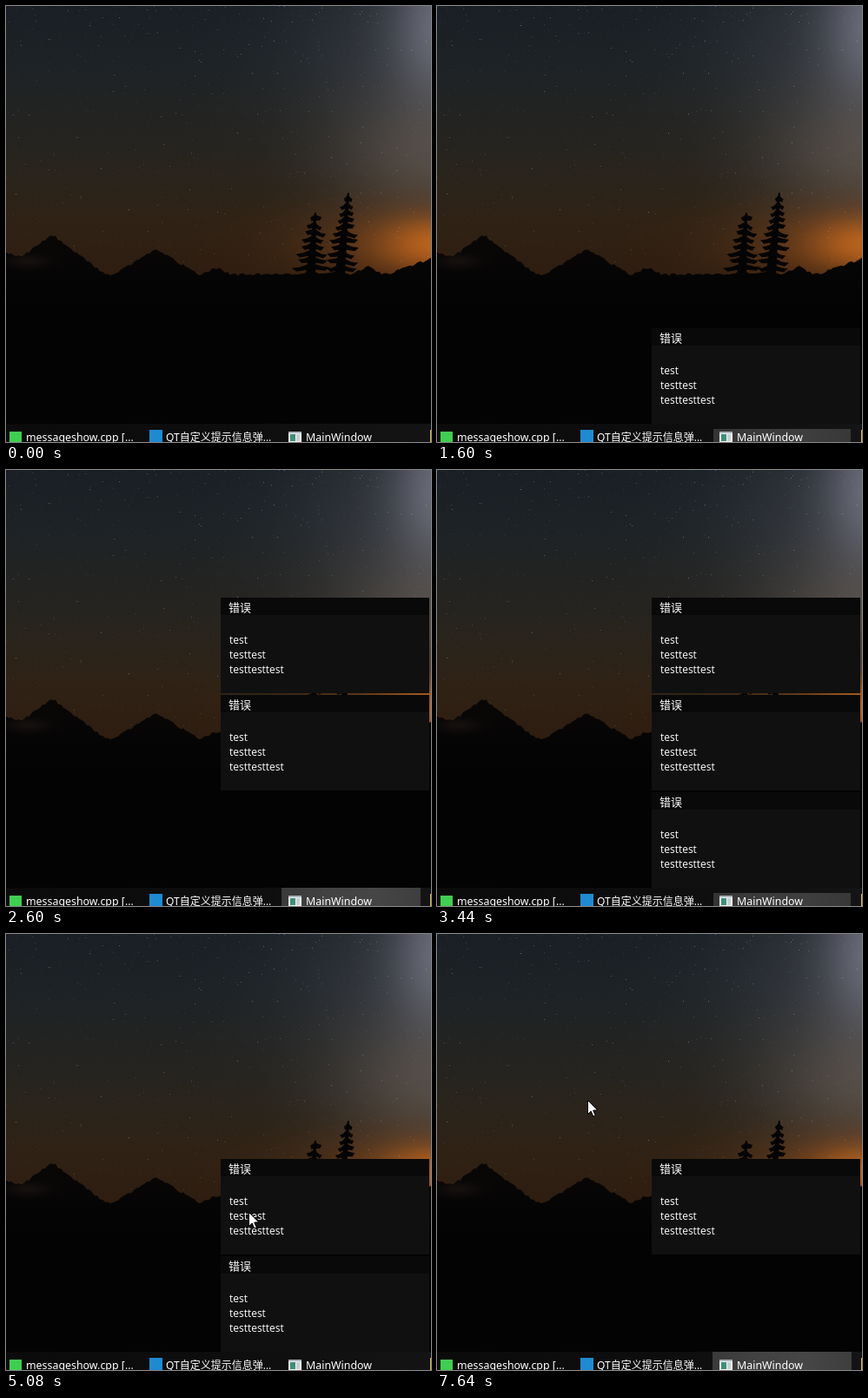
Write an HTML page with a canvas that moves like this. It is 489 px wide and 502 px high and loops after 8000 ms.

```html
<!DOCTYPE html>
<html lang="zh">
<head>
<meta charset="utf-8">
<style>
html, body { margin: 0; width: 100%; height: 100%; overflow: hidden; background: #000; }
canvas { display: block; }
</style>
</head>
<body>
<canvas id="stage" width="489" height="502"></canvas>
<script>
const W = 489, H = 502, LOOP = 8000, TICK = 40;
const BAR_Y = 481, HORIZON = 309;
const PANEL = { x: 247, y: 371, w: 240, h: 110, pitch: 112 };
const FADE_IN = 360, LIFE = 3080, FADE_STEP = 90;
const SANS = '"Noto Sans", "Noto Sans CJK SC", "Noto Sans CJK", sans-serif';

// The last activation opens no message; the hovered message does not expire
const activations = [640, 1600, 2560, 3440, 7560];
const messages = activations.slice(0, 4).map((at, i) => ({
  show: at + TICK,
  out: i === 2 ? Infinity : at + TICK + LIFE
}));

const ctx = document.getElementById('stage').getContext('2d');

const clamp = (v, lo = 0, hi = 1) => Math.min(hi, Math.max(lo, v));
const mix = (a, b, p) => a + (b - a) * p;
const easeOut = p => 1 - (1 - p) ** 2;

function seededRandom(seed) {
  return () => {
    seed = (seed * 1664525 + 1013904223) >>> 0;
    return seed / 4294967296;
  };
}

function polygon(c, points) {
  c.beginPath();
  points.forEach(([x, y]) => c.lineTo(x, y));
  c.closePath();
}

function box(color, x, y, w, h) {
  ctx.fillStyle = color;
  ctx.fillRect(x, y, w, h);
}

function write(text, x, y, size, family = SANS) {
  ctx.font = `${size}px ${family}`;
  ctx.fillStyle = '#fff';
  ctx.fillText(text, x, y);
}

function gradient(c, x0, y0, x1, y1, colors) {
  const g = c.createLinearGradient(x0, y0, x1, y1);
  colors.forEach((color, i) => g.addColorStop(i / (colors.length - 1), color));
  return g;
}

// Elliptical light with a Gaussian falloff
function glow(c, x, y, rx, ry, rgb, strength) {
  const g = c.createRadialGradient(0, 0, 0, 0, 0, 1);
  for (let r = 0; r <= 1; r += 0.125) {
    g.addColorStop(r, `rgba(${rgb},${strength * Math.exp(-4.5 * r * r) * (1 - r ** 4)})`);
  }
  c.save();
  c.translate(x, y);
  c.scale(rx, ry);
  c.fillStyle = g;
  c.fillRect(-1, -1, 2, 2);
  c.restore();
}

function drawSky(c) {
  c.fillStyle = gradient(c, 0, 0, 0, HORIZON,
    ['#1a1f25', '#1d2226', '#222322', '#28241d', '#2f2215', '#2e1d10']);
  c.fillRect(0, 0, W, HORIZON + 10);
  glow(c, 500, 60, 320, 300, '125,125,135', 0.3);
  glow(c, 500, 20, 110, 190, '155,155,175', 0.5);
  glow(c, 500, 175, 230, 150, '130,115,105', 0.42);
  glow(c, 500, 276, 300, 95, '185,95,30', 0.5);
  glow(c, 496, 274, 125, 60, '230,120,30', 0.6);
}

function drawStars(c) {
  const rnd = seededRandom(71);
  for (let i = 0; i < 1000; i++) {
    const x = Math.floor(rnd() * W), y = Math.floor(rnd() ** 1.25 * 295);
    const bright = rnd() ** 6;
    const tint = rnd() < 0.5 ? '190,170,150' : '150,165,190';
    c.fillStyle = `rgba(${tint},${0.08 + bright * 0.45})`;
    c.fillRect(x, y, 1, 1);
  }
}

// Ridge line: the highest of a few sloping peaks above a flat horizon
function ridgeY(x) {
  const peaks = [[0, 284, 0.25], [53, 263, 0.75], [173, 280, 0.6],
    [242, 301, 0.45], [416, 299, 0.6], [489, 291, 0.35]];
  return Math.min(HORIZON, ...peaks.map(([px, py, slope]) => py + Math.abs(x - px) * slope));
}

function drawLand(c) {
  const rnd = seededRandom(5);
  const ridge = [];
  for (let x = 0; x <= W + 3; x += 3) ridge.push([x, ridgeY(x) + rnd() * 3 - 1.5]);
  c.fillStyle = gradient(c, 0, 262, 0, 350, ['#090706', '#060505', '#030303']);
  polygon(c, [...ridge, [W, H], [0, H]]);
  c.fill();
  glow(c, 25, 294, 48, 16, '50,34,32', 0.35);
}

// Ragged conifer: thin trunk with drooping tiers of uneven branches
function drawTree(c, tip, top, foot, base, half, seed) {
  const rnd = seededRandom(seed);
  c.fillStyle = '#050404';
  polygon(c, [[tip - 1, top], [tip + 1, top], [foot + 6, base], [foot - 6, base]]);
  c.fill();
  for (let y = top + 6; y < base; y += 8) {
    const p = (y - top) / (base - top);
    const x = mix(tip, foot, p);
    for (const side of [-1, 1]) {
      const reach = side * half * Math.sqrt(p) * mix(0.75, 1.15, rnd());
      const droop = mix(0, 4, rnd());
      polygon(c, [[x, y - 4], [x + reach * 0.6, y + droop - 2],
        [x + reach, y + droop - 1], [x + reach * 0.75, y + droop + 3], [x, y + 3]]);
      c.fill();
    }
  }
}

function buildBackdrop() {
  const layer = document.createElement('canvas');
  layer.width = W;
  layer.height = H;
  const c = layer.getContext('2d');
  drawSky(c);
  drawStars(c);
  drawLand(c);
  drawTree(c, 356, 238, 350, 316, 24, 9);
  drawTree(c, 394, 215, 384, 310, 21, 23);
  c.fillStyle = gradient(c, 0, 0, W, 0, ['#0b0b0b', '#0d0d0d', '#141414']);
  c.fillRect(0, BAR_Y, W, H - BAR_Y);
  c.fillStyle = '#e3c520';
  c.fillRect(488, 488, 1, 14);
  return layer;
}

function drawHighlight(t) {
  const start = activations.filter(at => at <= t).pop();
  if (start === undefined) return;
  const age = t - start;
  const inset = age < TICK ? 1 : 0;
  const stays = start === activations[activations.length - 1];
  ctx.globalAlpha = inset ? 0.85 : stays ? 1 : clamp((320 - age) / 200);
  box(gradient(ctx, 317, 0, 477, 0, ['#3a3a3a', '#424242', '#464646', '#3e3e3e']),
    317 + inset, BAR_Y + inset * 6, 160 - inset * 2, H - BAR_Y);
  ctx.globalAlpha = 1;
}

function drawBarItems() {
  box('#41cd52', 4, 490, 14, 12);
  write('messageshow.cpp [...', 23, 501, 12.4);
  box('#1f8ad2', 165, 488, 15, 14);
  write('QT自定义提示信息弹...', 184, 501, 12);
  box('#f2f2f2', 325, 490, 15, 12);
  box('#a9b4bc', 325, 490, 15, 2);
  box('#3f8f78', 327, 493, 6, 8);
  box('#c9d0d4', 334, 493, 4, 8);
  write('MainWindow', 345, 501, 12.4);
}

function messageAlpha({ show, out }, t) {
  const steps = t < out
    ? Math.floor(5 * (t - show) / FADE_IN)
    : 4 - Math.floor((t - out) / FADE_STEP);
  return clamp(steps / 5);
}

function drawMessage(y, alpha) {
  const { x, w, h } = PANEL;
  ctx.globalAlpha = alpha;
  box('#101010', x, y, w, h);
  box('#090909', x, y, w, 20);
  write('错误', x + 9, y + 16, 13);
  for (let i = 0; i < 3; i++) {
    write('test'.repeat(i + 1), x + 10, y + 53 + i * 17, 12, '"Open Sans", sans-serif');
  }
  ctx.globalAlpha = 1;
}

// Each new message pushes the older ones up one slot
function drawMessages(t) {
  const shown = messages.filter(m => m.show <= t);
  shown.forEach((m, i) => {
    const slot = shown.length - 1 - i;
    drawMessage(PANEL.y - slot * PANEL.pitch, messageAlpha(m, t));
  });
}

function cursorAt(t) {
  const move = (from, to, start, end) => {
    const p = easeOut(clamp((t - start) / (end - start)));
    return from.map((v, i) => Math.round(mix(v, to[i], p)));
  };
  const enter = [152, 12], turn = [185, 257], rest = [279, 320], leave = [173, 191];
  if (t < 4000) return move(enter, turn, 3840, 4000);
  if (t < 7160) return move(turn, rest, 4000, 4360);
  return move(rest, leave, 7160, 7640);
}

function drawCursor(t) {
  if (t < 3840) return;
  const [x, y] = cursorAt(t);
  ctx.save();
  ctx.translate(x + 0.5, y + 0.5);
  polygon(ctx, [[0, 0], [0, 16], [3.7, 12.5], [6.3, 18.5], [8.7, 17.4], [6.2, 11.6], [11.3, 11.3]]);
  ctx.fillStyle = '#fff';
  ctx.fill();
  ctx.strokeStyle = '#000';
  ctx.stroke();
  ctx.restore();
}

const backdrop = buildBackdrop();
const origin = performance.now();

function render() {
  const t = Math.floor((performance.now() - origin) % LOOP / TICK) * TICK;
  ctx.drawImage(backdrop, 0, 0);
  drawHighlight(t);
  drawBarItems();
  drawMessages(t);
  drawCursor(t);
  requestAnimationFrame(render);
}
render();
</script>
</body>
</html>
```
